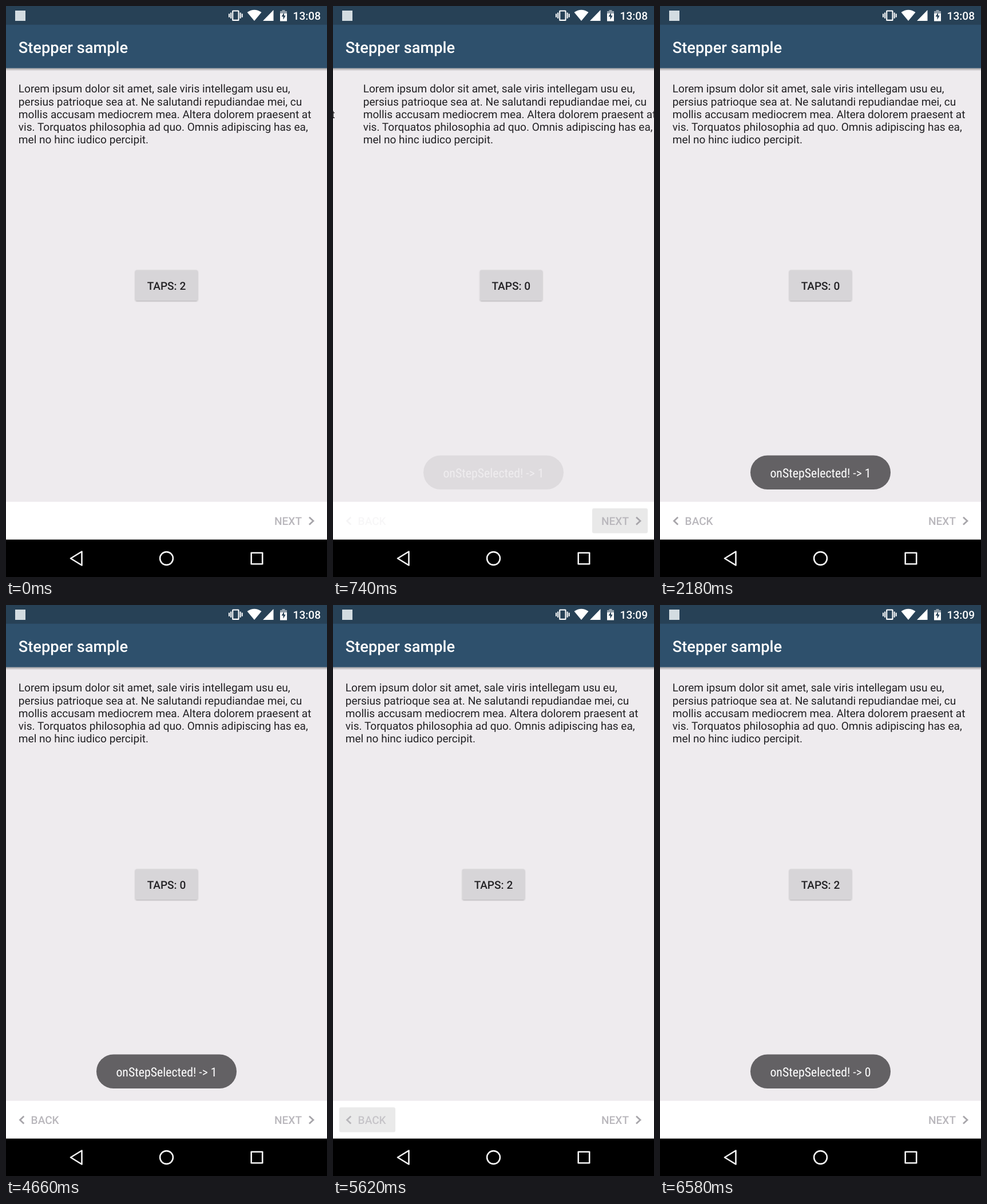
Write an HTML page that moves like this. It is 561 by 998 pixels and loops after 8000 ms.

```html
<!DOCTYPE html>
<html lang="en">
<head>
<meta charset="utf-8">
<title>Stepper sample</title>
<style>
  html, body { margin: 0; width: 100%; height: 100%; overflow: hidden; background: #000; }
  svg { display: block; width: 100%; height: 100%; }
  text { font: 19.09px Roboto, sans-serif; text-rendering: geometricPrecision; }
  .medium { font-weight: 500; }
  .title { font-size: 27.27px; fill: #fff; }
  .toast { font: condensed 21.82px "Roboto Condensed", Roboto, sans-serif; font-stretch: condensed; fill: #fff; }
  .page { fill: #222124; }
  .middle { text-anchor: middle; }
  .nav { fill: none; stroke: #f4f4f4; stroke-width: 2.6; stroke-linejoin: round; }
  .label { fill: #b9b7bc; }
  .chevron { fill: none; stroke: #a7a5aa; stroke-width: 2.8; }
</style>
</head>
<body>
<svg viewBox="0 0 561 998">
  <defs>
    <linearGradient id="shade" x2="0" y2="1">
      <stop stop-color="#000" stop-opacity=".32"/>
      <stop offset="1" stop-color="#000" stop-opacity="0"/>
    </linearGradient>
    <filter id="lift" x="-10%" y="-20%" width="120%" height="150%">
      <feDropShadow dx="0" dy="1" stdDeviation="1.1" flood-opacity=".28"/>
    </filter>
  </defs>

  <rect width="561" height="998" fill="#eeebee"/>
  <g id="pages"></g>

  <rect y="108.7" width="561" height="5" fill="url(#shade)"/>
  <rect y="32" width="561" height="76.7" fill="#2e506c"/>
  <rect width="561" height="32.7" fill="#274156"/>
  <text class="medium title" x="21.8" y="81.5">Stepper sample</text>

  <g id="status" fill="#fff">
    <rect x="16" y="8" width="18" height="18" fill="#d3dce1"/>
    <path transform="translate(389 4.3) scale(1.03)" fill-rule="evenodd"
      d="M0 15h2V9H0ZM3 17h2V7H3ZM22 9v6h2V9ZM19 17h2V7h-2ZM7.500 3h9a1.500 1.500 0 0 1 1.500 1.500v15a1.500 1.500 0 0 1-1.500 1.500h-9a1.500 1.500 0 0 1-1.500-1.500v-15a1.500 1.500 0 0 1 1.500-1.500ZM8 5v14h8V5Z"/>
    <path d="M434 26L421.500 11Q434 2.500 446.500 11Z"/>
    <path d="M449 26L467.500 7V26Z"/>
    <path d="M479 9h3.500V7h5v2h3.500v4h-12Z" opacity=".5"/>
    <path d="M479 13h12v13.500h-12Z"/>
    <path d="M486 11.500L481.500 18.500H484.500V24L488.700 16.700H486Z" fill="#274156"/>
    <text id="clock" class="medium" x="550" y="24" text-anchor="end"></text>
  </g>

  <rect y="866.6" width="561" height="66" fill="#fff"/>
  <g id="back">
    <rect id="backRipple" x="11" y="878" width="98" height="43.500" rx="2.700"/>
    <path class="chevron" d="M31.300 893.500L24.500 900L31.300 906.500"/>
    <text class="medium label" x="43.6" y="907.3">BACK</text>
  </g>
  <rect id="nextRipple" x="453" y="878" width="97" height="43.500" rx="2.700"/>
  <path class="chevron" d="M530 893.500L537 900L530 906.500"/>
  <text class="medium label" x="469" y="907.3">NEXT</text>

  <g id="toast">
    <rect x="158" y="785.5" width="245" height="59.500" rx="29.750" fill="#636164"/>
    <text id="toastText" class="toast middle" x="280.5" y="824"></text>
  </g>

  <rect y="932.6" width="561" height="66"/>
  <g class="nav">
    <path d="M113 965.500L132.500 953.500V977.500Z"/>
    <circle cx="280.5" cy="965.5" r="11.4"/>
    <rect x="428.700" y="955.800" width="19.500" height="19.500"/>
  </g>
</svg>
<script>
const LOOP = 8000, WIDTH = 561, FRAME = 80, FIRST_FRAME = 20;
const LINES = [
  'Lorem ipsum dolor sit amet, sale viris intellegam usu eu,',
  'persius patrioque sea at. Ne salutandi repudiandae mei, cu',
  'mollis accusam mediocrem mea. Altera dolorem praesent at',
  'vis. Torquatos philosophia ad quo. Omnis adipiscing has ea,',
  'mel no hinc iudico percipit.'
];
const $ = id => document.getElementById(id);

const pageMarkup = (taps, index) => `
  <g class="page" transform="translate(${index * WIDTH})">
    ${LINES.map((line, i) => `<text x="21.8" y="${151.3 + i * 22.22}">${line}</text>`).join('')}
    <rect x="226" y="461.5" width="109" height="53.5" rx="2.7" fill="#d7d5d8" filter="url(#lift)"/>
    <text class="medium middle" x="280.5" y="495.6">TAPS: ${taps}</text>
  </g>`;
$('pages').innerHTML = [2, 0].map(pageMarkup).join('');

const progress = (t, start, duration) => Math.min(1, Math.max(0, (t - start) / duration));
const quintOut = p => 1 - (1 - p) ** 5;
const quadOut = p => 1 - (1 - p) ** 2;
const easeInOut = p => (1 - Math.cos(p * Math.PI)) / 2;

// Press highlight: rises, holds, then fades.
const ripple = (t, start) => 0.1 * (progress(t, start, 160) - progress(t, start + 400, 240));

function draw(t) {
  const page = quintOut(progress(t, 652, 200)) - quintOut(progress(t, 5447, 200));
  $('pages').setAttribute('transform', `translate(${-page * WIDTH})`);

  $('back').style.opacity = easeInOut(progress(t, 610, 600)) - easeInOut(progress(t, 5450, 590));
  $('nextRipple').style.opacity = ripple(t, 605);
  $('backRipple').style.opacity = ripple(t, 5450);

  const second = t >= 5620;
  $('clock').textContent = second ? '13:09' : '13:08';
  $('toastText').textContent = `onStepSelected! -> ${second ? 0 : 1}`;
  $('toast').style.opacity = second
    ? quadOut(progress(t, 5674, 500))
    : quadOut(progress(t, 712, 500)) - progress(t, 5140, 430);
}

function tick() {
  const t = performance.now() % LOOP;
  draw(Math.max(0, Math.floor((t - FIRST_FRAME) / FRAME) * FRAME + FIRST_FRAME));
  requestAnimationFrame(tick);
}
tick();
</script>
</body>
</html>
```
